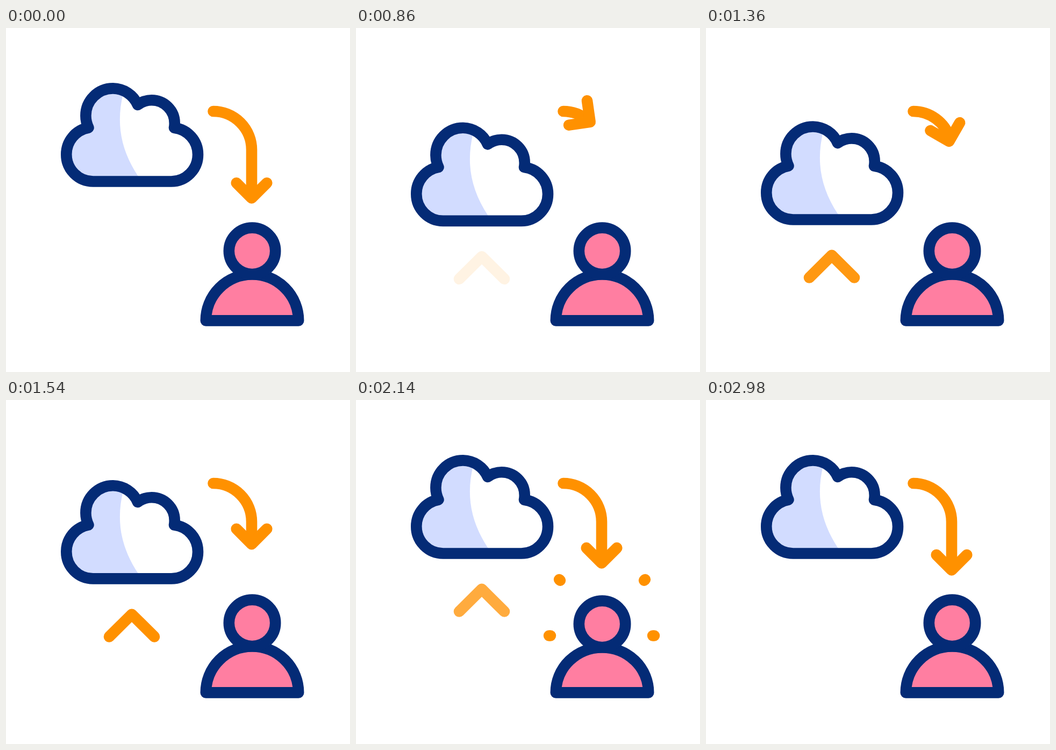
An HTML page for the animation above (3220 ms loop, 640 by 640 pixels).

```html
<!DOCTYPE html>
<html lang="en">
<head>
<meta charset="utf-8">
<title>Cloud to user</title>
<style>
  html, body { margin: 0; width: 100%; height: 100%; overflow: hidden; background: #fff; }
  svg { display: block; width: 100vw; height: 100vh; }
  .line { fill: none; stroke-width: 20.6; stroke-linecap: round; stroke-linejoin: round; }
  .navy { stroke: #042b76; }
  .orange { stroke: #ff9100; }
  .pink { fill: #ff7ea1; }
</style>
</head>
<body>
<svg viewBox="0 0 640 640">
  <defs>
    <path id="outline" d="M162 285.5H307.5A49.8 49.8 0 0 0 357 235.5A49.8 49.8 0 0 0 313 185.7
      A42.8 42.8 0 0 0 313.7 177A42.7 42.7 0 0 0 271 134.3A42.8 42.8 0 0 0 245 143
      A50.6 50.6 0 0 0 199 112.4A50.6 50.6 0 0 0 148.4 163A50.6 50.6 0 0 0 153.5 185.5
      A50.2 50.2 0 0 0 112.3 235.5A50 50 0 0 0 162 285.5Z"/>
    <clipPath id="inside"><use href="#outline"/></clipPath>
  </defs>

  <g id="cloud">
    <path id="chevron" class="line orange" d="M192 393.5L234 351.8L276 393.5"/>
    <use href="#outline" fill="#fff"/>
    <path clip-path="url(#inside)" fill="#d2dcff" d="M100 100H224L218 122C205 175 212 225 246 276L254 290H100Z"/>
    <use href="#outline" class="line navy"/>
  </g>

  <path id="shaft" class="line orange" d="M385.5 155A71.5 71.5 0 0 1 457 226.5V320"/>
  <path id="tip" class="line orange" d="M-28.3 -28.3L0 0L-28.3 28.3"/>

  <g id="dots" class="line orange"></g>

  <path id="body" class="line navy pink" style="fill:#ff7ea1"/>
  <circle id="head" class="line navy" style="fill:#ff7ea1" cx="458" r="43.2"/>
</svg>
<script>
const LOOP = 3220, ARC = 112, FULL = 202;
const $ = id => document.getElementById(id);

// Each track is a list of [ms, value], joined by a smooth monotone curve.
const tracks = {
  drop: [[205, 0], [1045, 83.7], [1155, 83.7], [1995, 0]],
  fade: [[700, 0], [1483, 1], [1890, 1], [2670, 0]],
  reach: [[200, FULL], [540, 66], [860, 55], [1000, 53.5], [1360, 95.6],
          [1720, 200], [1800, FULL], [2140, 189], [2400, 180], [3000, FULL]],
  squash: [[1540, 0], [1720, 8.2], [1820, 10], [2140, 2], [2280, 0]],
  burst: [[1500, -1.6], [1720, 0], [2140, 1], [2300, 1.03]],
  dotFade: [[2180, 1], [2320, 0]]
};

function grade(p, i) {
  return (p[i + 1][1] - p[i][1]) / (p[i + 1][0] - p[i][0]);
}

function slope(p, i) {
  if (i === 0 || i === p.length - 1) return 0;
  const a = grade(p, i - 1), b = grade(p, i);
  return a * b > 0 ? 2 * a * b / (a + b) : 0;
}

function at(name, t) {
  const p = tracks[name], last = p.length - 1;
  if (t <= p[0][0]) return p[0][1];
  if (t >= p[last][0]) return p[last][1];
  let i = 0;
  while (t >= p[i + 1][0]) i++;
  const h = p[i + 1][0] - p[i][0], u = (t - p[i][0]) / h, v = 1 - u;
  return p[i][1] * v * v * (1 + 2 * u) + p[i + 1][1] * u * u * (3 - 2 * u)
    + h * u * v * (slope(p, i) * v - slope(p, i + 1) * u);
}

const dots = [0, 1, 2, 3].map(() => {
  const dot = document.createElementNS("http://www.w3.org/2000/svg", "path");
  return $("dots").appendChild(dot);
});

function drawArrow(reach) {
  const angle = Math.min(reach / ARC * 90, 90), rad = Math.PI / 180;
  let x = 457, y = 226.5 + reach - ARC;
  if (reach < ARC) {
    const r = 71.3 - 4 * Math.sin((angle - 45) * 4 * rad);
    x = 385.8 + r * Math.sin(angle * rad);
    y = 226.2 - r * Math.cos(angle * rad);
  }
  $("shaft").setAttribute("stroke-dasharray", `${reach - 5} 999`);
  $("tip").setAttribute("transform", `translate(${x} ${y}) rotate(${90 - (90 - angle) * 1.16})`);
}

function drawDots(t) {
  const q = at("burst", t), shown = t > 1500 ? at("dotFade", t) : 0;
  $("dots").setAttribute("opacity", shown);
  dots.forEach((dot, i) => {
    const side = i % 2 ? 1 : -1, high = i < 2;
    const x = high ? 458 + side * (57.5 + 21.5 * q) : 457 + side * (63 + 33.5 * q);
    const y = high ? 355 - 20.2 * q : 438.5;
    const dx = side * (high ? 0.9 : 1.4), dy = high ? -0.8 : 0;
    dot.setAttribute("d", `M${x - dx} ${y - dy}L${x + dx} ${y + dy}`);
  });
}

function draw(t) {
  $("cloud").setAttribute("transform", `translate(0 ${at("drop", t)})`);
  $("chevron").setAttribute("opacity", at("fade", t));
  drawArrow(at("reach", t));
  drawDots(t);
  const squash = at("squash", t);
  $("head").setAttribute("cy", 414.8 + squash);
  $("body").setAttribute("d", `M371.8 544.4A86.2 ${86 - squash} 0 0 1 544.2 544.4Z`);
}

const start = performance.now();
function tick() {
  draw((performance.now() - start) % LOOP);
  requestAnimationFrame(tick);
}
tick();
</script>
</body>
</html>
```
